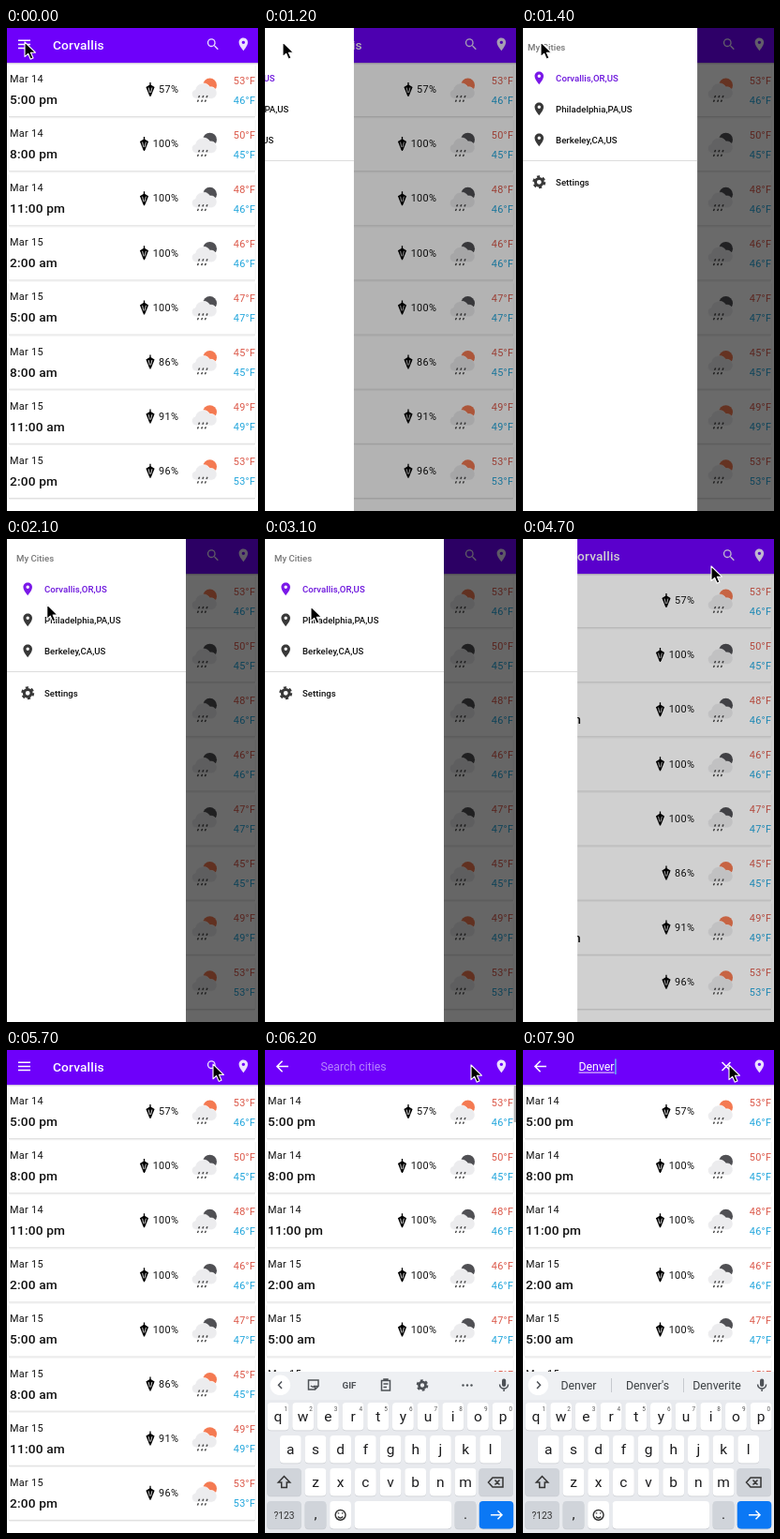
An HTML page for the animation above (8000 ms loop, 269 by 515 pixels).

```html
<!DOCTYPE html>
<html lang="en">
<head>
<meta charset="utf-8">
<title>Forecast</title>
<style>
html, body { margin: 0; width: 100%; height: 100%; overflow: hidden; background: #fff; }
svg { display: block; width: 100%; height: 100%; font-family: Roboto, sans-serif; }
.body { font-size: 10.9px; letter-spacing: .32px; }
.head { font-size: 13.7px; letter-spacing: .17px; font-weight: 500; }
.nav { font-size: 9.6px; font-weight: 500; letter-spacing: .03px; }
.field { font-size: 12.3px; }
.key { font-size: 15.5px; }
.mid { text-anchor: middle; }
.end { text-anchor: end; }
.line { fill: none; stroke-width: 1.5; }
</style>
</head>
<body>
<svg id="stage" viewBox="0 0 269 515"></svg>
<script>
const LOOP = 8000, BAR = '#6e00fa', DRAWER = 192, ICON = '#4d5156';
const PIN = 'M12 2C8.1 2 5 5.1 5 9c0 5.25 7 13 7 13s7-7.75 7-13c0-3.9-3.1-7-7-7zm0 9.5a2.5 2.5 0 1 1 0-5 2.5 2.5 0 0 1 0 5z';
const SEARCH = 'M15.5 14h-.8l-.3-.3A6.5 6.5 0 1 0 13.7 14.4l.3.3v.8l5 5 1.5-1.5zm-6 0a4.5 4.5 0 1 1 0-9 4.5 4.5 0 0 1 0 9z';

const text = (x, y, s, cls, fill = '#111', extra = '') =>
  `<text x="${x}" y="${y}" class="${cls}" fill="${fill}" ${extra}>${s}</text>`;
const rect = (x, y, w, h, fill, r = 0, extra = '') =>
  `<rect x="${x}" y="${y}" width="${w}" height="${h}" rx="${r}" fill="${fill}" ${extra}/>`;
const line = (d, stroke, extra = '') => `<path d="${d}" class="line" stroke="${stroke}" ${extra}/>`;
const icon = (d, x, y, fill) => `<path d="${d}" fill="${fill}" transform="translate(${x} ${y}) scale(.683)"/>`;
const gear = (x, y, color, k = 1) => `<g transform="translate(${x} ${y}) scale(${k})" fill="none" stroke="${color}">
  <circle r="3.9" stroke-width="3"/><circle r="5.9" stroke-width="2.2" stroke-dasharray="3.1 3.08"/></g>`;
const group = (id, content, hidden) => `<g id="${id}"${hidden ? ' display="none"' : ''}>${content}</g>`;

// date, time, rain chance, high, low, daylight
const forecast = [
  ['Mar 14', '5:00 pm', 57, 53, 46, 1],
  ['Mar 14', '8:00 pm', 100, 50, 45, 0],
  ['Mar 14', '11:00 pm', 100, 48, 46, 0],
  ['Mar 15', '2:00 am', 100, 46, 46, 0],
  ['Mar 15', '5:00 am', 100, 47, 47, 0],
  ['Mar 15', '8:00 am', 86, 45, 45, 1],
  ['Mar 15', '11:00 am', 91, 49, 49, 1],
  ['Mar 15', '2:00 pm', 96, 53, 53, 1],
];

const umbrella = x => `<g transform="translate(${x} 57)">
  <path d="M0 1V5M0 13V16" stroke="#000" stroke-width="1.3"/>
  <path d="M-4.6 6L0 3.2 4.6 6 1 15H-1z"/>
  <path d="M-1.9 6.5L-.6 12M1.9 6.5L.6 12" stroke="#fff" stroke-width=".8"/></g>`;

const weather = day => `<circle cx="217.6" cy="61" r="7.4" fill="${day ? '#f47a52' : '#505054'}"/>
  <path d="M203 75.5a5 5 0 0 1-1-9.8a8.6 8.6 0 0 1 15.6-2.8a6.4 6.4 0 0 1 2.3 12.6z" fill="#ececee" stroke="#fff" stroke-width=".7"/>
  <path d="M206.6 72l-1 2.2M210.8 72l-1 2.2M215 72l-1 2.2M205.4 76.6l-1 2.2M209.6 76.6l-1 2.2M213.4 76.6l-1 2.2" stroke="#444" stroke-width="1.4"/>`;

const row = ([date, time, rain, high, low, day], i) => `<g transform="translate(0 ${58.1 * i})">
  ${rect(3, 94.2, 263, 1, '#dadada')}${rect(3.5, 95.2, 262, 1, '#f1f1f1')}
  ${rect(2.5, 40, .7, 54, '#eeeeee')}${rect(265.8, 40, .7, 54, '#eeeeee')}
  ${text(4, 58, date, 'body')}${text(4, 81, time, 'head')}
  ${umbrella(rain === 100 ? 147.5 : 154)}${text(184.3, 69.3, rain + '%', 'body end')}
  ${weather(day)}
  ${text(266.3, 59.6, high + '°F', 'body end', '#dc594a')}${text(266.3, 80.8, low + '°F', 'body end', '#22a6dc')}</g>`;

const home = line('M13 13.3H26M13 17.4H26M13 21.5H26', '#fff') +
  text(50, 23, 'Corvallis', 'head', '#fff') + icon(SEARCH, 212.8, 9.2, '#ece0ff');

const searchBar = line('M26 17.5H14M19.6 11.8L13.9 17.5L19.6 23.2', '#fff') +
  text(60.5, 22, 'Search cities', 'field', '#b684fc', 'id="hint"') +
  text(60.5, 22, '', 'field', '#fff', 'id="query"') +
  rect(60.5, 23.6, 0, .9, '#fff', 0, 'id="underline"') +
  rect(60.3, 9.5, 1.3, 16.5, '#63d3ee', 0, 'id="caret"') +
  group('clear', line('M213.5 13L222.5 22M222.5 13L213.5 22', '#fff'));

const navItem = (y, label, color, mark) => mark + text(41, y + 3.6, label, 'nav', color);
const pinItem = (y, label, color, tint) => navItem(y, label, color, icon(PIN, 15, y - 8.4, tint));
const drawer = rect(0, 0, DRAWER, 515, '#fff') +
  text(11, 24, 'My Cities', 'nav', '#777') +
  pinItem(53.5, 'Corvallis,OR,US', '#6a12dc', '#7a18e8') +
  pinItem(86.5, 'Philadelphia,PA,US', '#111', '#383838') +
  pinItem(119.5, 'Berkeley,CA,US', '#111', '#383838') +
  rect(0, 141, DRAWER, 1, '#dcdcdc') +
  navItem(164.5, 'Settings', '#111', gear(23.2, 164.3, '#383838'));

const key = (x, y, w, fill = '#fff') =>
  rect(x - w / 2, y - 14.2, w, 29.4, '#c9ccd1', 4) + rect(x - w / 2, y - 15, w, 29.4, fill, 4);
const letters = (word, x0, y) => [...word].map((c, i) => {
  const x = x0 + 26.68 * i;
  return key(x, y, 22.8) + text(x, y + 5, c, 'key mid', '#1c1c1e') +
    (y < 400 ? text(x + 8.3, y - 6.5, (i + 1) % 10, 'mid', '#555', 'font-size="6.4"') : '');
}).join('');

const GREY = '#d0d4da';
const tools = line('M19 353.5L15.5 357.3L19 361', ICON) +
  line('M47.5 352H58V358.5L54.5 362H47.5zM54.5 362V358.5H58M50 358Q52.5 360.5 54 358M50.5 355h.1M55 355h.1', ICON, 'stroke-width="1.2"') +
  text(91, 361, 'GIF', 'mid', ICON, 'font-size="9.8" font-weight="700"') +
  line('M125.5 352.5H134.5V363H125.5zM128 352.5V351H132V352.5M127.5 356H132.5M127.5 359.5H131', ICON, 'stroke-width="1.3"') +
  gear(169, 357.5, ICON, .9) +
  [212.5, 217, 221.5].map(x => `<circle cx="${x}" cy="357.5" r="1.2" fill="${ICON}"/>`).join('');
const suggestionBar = line('M16 353.5L19.5 357.3L16 361', ICON) +
  rect(95, 350, 1, 15, '#c6c9ce') + rect(172, 350, 1, 15, '#c6c9ce') +
  [60.5, 134, 208].map(x => text(x, 362, '', 'field mid word', '#3c4043')).join('');

const keyboard = rect(0, 343, 269, 172, '#e8eaee') +
  rect(0, 343, 269, 30, '#eef0f3') +
  '<circle cx="17.3" cy="357.3" r="10.8" fill="#fff"/>' +
  group('tools', tools) + group('suggestions', suggestionBar) +
  rect(254, 350.5, 4.2, 8.5, ICON, 2.1) + line('M251.6 356.5a4.5 4.5 0 0 0 9 0M256.1 361V364', ICON, 'stroke-width="1.2"') +
  letters('qwertyuiop', 15, 391) + letters('asdfghjkl', 28.3, 426) + letters('zxcvbnm', 55, 461) +
  key(21.5, 461, 36.5, GREY) + line('M21.5 454.5L15.3 461H18.7V466.5H24.3V461H27.7z', '#333', 'stroke-width="1.3"') +
  key(247.7, 461, 36.5, GREY) + line('M244 456H255V466H244L239.5 461zM246.5 458.5L251.5 463.5M251.5 458.5L246.5 463.5', '#333', 'stroke-width="1.3"') +
  key(21.5, 496, 36.5, GREY) + text(21.5, 499.6, '?123', 'mid', '#333', 'font-size="10.2"') +
  key(55, 496, 22.8, GREY) + text(55, 500, ',', 'key mid', '#222') +
  key(81.6, 496, 22.8) + '<circle cx="81.6" cy="495.8" r="5.4" class="line" stroke="#333" stroke-width="1.2"/>' +
  line('M79 497.4Q81.6 500.5 84.2 497.4M79.5 493.2v1.4M83.7 493.2v1.4', '#333', 'stroke-width="1.2"') +
  key(148.3, 496, 103.5) +
  key(215, 496, 22.8, GREY) + text(215, 500, '.', 'key mid', '#222') +
  key(248, 496, 36.5, '#0b78f5') + line('M242 495.8H254M249.5 491.3L254 495.8L249.5 500.3', '#fff');

const $ = id => document.getElementById(id);
$('stage').innerHTML = rect(0, 0, 269, 515, '#fff') + forecast.map(row).join('') +
  rect(0, 37, 269, 1, '#cfc6de') + rect(0, 38, 269, 1, '#eeeaf3') +
  rect(0, 0, 269, 37, BAR) + icon(PIN, 245.2, 9.2, '#ece0ff') +
  group('home', home) + group('searchBar', searchBar, true) +
  rect(266.8, 38, 2.2, 39, '#b5b5b5', 0, 'id="scrollbar"') +
  group('keyboard', keyboard) +
  rect(0, 0, 269, 515, '#000', 0, 'id="scrim"') + group('drawer', drawer) +
  rect(0, 0, 1, 515, '#000') +
  group('pointer', '<path d="M0 0V15.6L3.6 12.3L6.2 18.2L9 17L6.4 11.2H11.4z" stroke="#fff" stroke-width="1.1" stroke-linejoin="round"/>');

const clamp = v => Math.min(1, Math.max(0, v));
const settle = (t, start, duration) => 1 - (1 - clamp((t - start) / duration)) ** 5;
const show = (id, on) => $(id).setAttribute('display', on ? 'inline' : 'none');

// time, x, y
const pointerPath = [
  [1400, 20, 15], [1900, 42, 42], [2400, 47, 121], [2800, 50, 108], [3100, 50, 72],
  [3700, 123, 37], [4400, 202, 29], [4700, 202, 29], [5500, 221, 15], [6200, 221, 16],
];
function pointerAt(t) {
  const next = pointerPath.findIndex(p => p[0] > t);
  if (next < 1) return (next ? pointerPath.at(-1) : pointerPath[0]).slice(1);
  const a = pointerPath[next - 1], b = pointerPath[next];
  const u = (t - a[0]) / (b[0] - a[0]), k = u * u * (3 - 2 * u);
  return [a[1] + (b[1] - a[1]) * k, a[2] + (b[2] - a[2]) * k];
}

const keyTimes = [6800, 7000, 7200, 7500, 7700, 7800];
const guesses = [
  ['', '', ''], ['D', 'Do', 'Did'], ['De', 'Dear', 'Dec'], ['Den', 'Denver', 'Dental'],
  ['Denv', 'Denver', "Denver's"], ['Denve', 'Denver', "Denver's"], ['Denver', "Denver's", 'Denverite'],
];
const typedBy = t => keyTimes.filter(k => k <= t).length;

function draw(t) {
  const open = settle(t, 1134, 512) - settle(t, 4592, 512);
  $('drawer').setAttribute('transform', `translate(${1 - DRAWER + (DRAWER - .5) * open - .5})`);
  show('drawer', open > 0);
  $('scrim').setAttribute('opacity', .6 * open);
  $('pointer').setAttribute('transform', `translate(${pointerAt(t)})`);

  const searching = t >= 5800, typed = typedBy(t);
  show('home', !searching);
  show('searchBar', searching);
  show('scrollbar', t >= 5900 && t < 6300);
  show('keyboard', t >= 5900);
  $('keyboard').setAttribute('transform', `translate(0 ${172 * (1 - settle(t, 5850, 300))})`);

  show('hint', !typed);
  show('clear', typed);
  show('caret', t < 6100 || t >= 6600);
  $('query').textContent = 'Denver'.slice(0, typed);
  const width = typed ? $('query').getComputedTextLength() : 0;
  $('underline').setAttribute('width', width);
  $('caret').setAttribute('x', 60.3 + width + (typed ? 1 : 0));

  const guess = typedBy(t - 100);
  show('tools', !guess);
  show('suggestions', guess);
  document.querySelectorAll('.word').forEach((el, i) => { el.textContent = guesses[guess][i]; });
}

const begin = performance.now();
function tick() {
  // The screen refreshes ten times a second.
  draw(Math.floor((performance.now() - begin) % LOOP / 100) * 100);
  requestAnimationFrame(tick);
}
tick();
</script>
</body>
</html>
```
